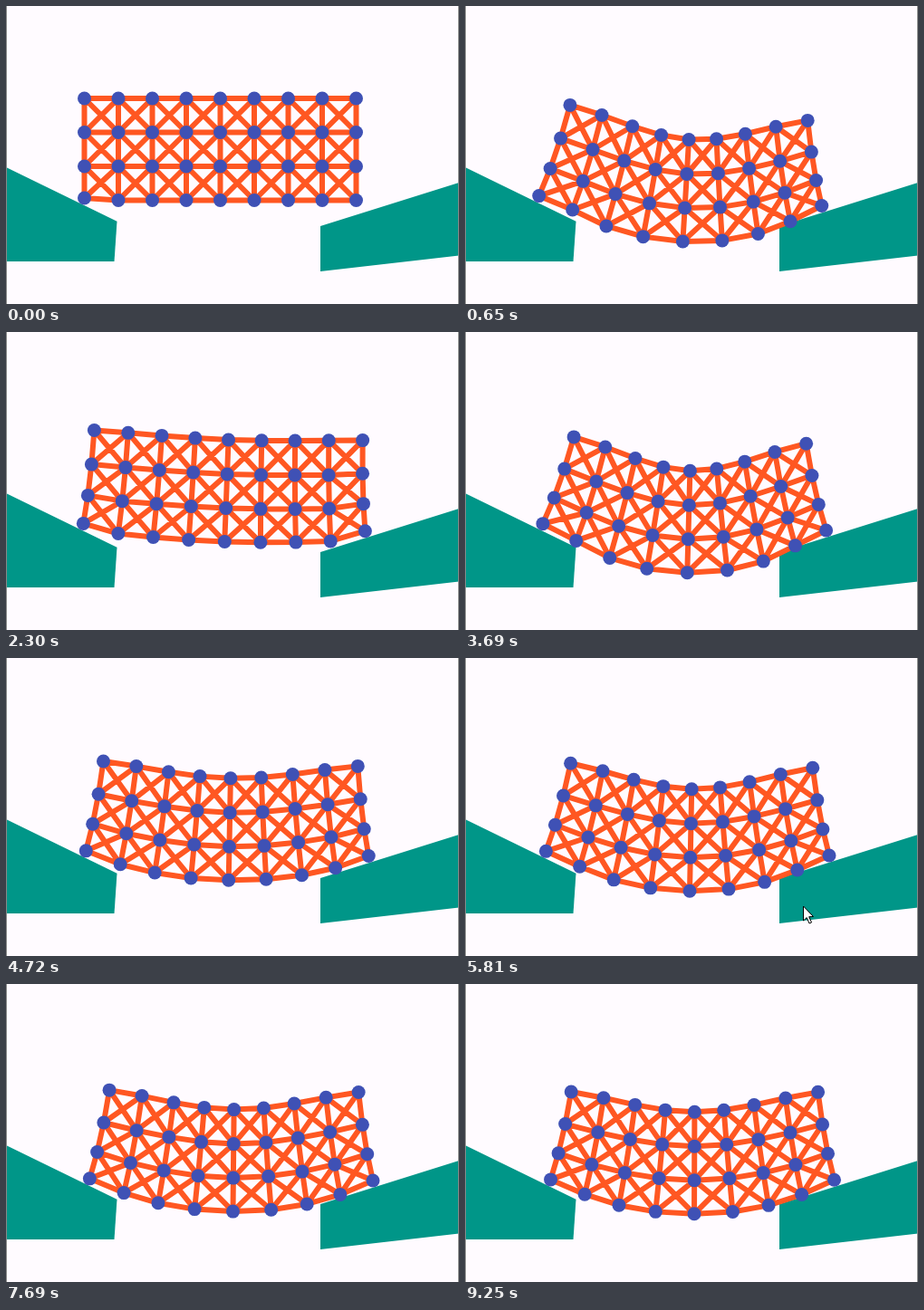
Recreate the animation shown at these times as an HTML page with a canvas. Size 500 px wide and 329 px high, loop 9270 ms.

```html
<!DOCTYPE html>
<html lang="en">
<head>
<meta charset="utf-8">
<title>Soft body</title>
<style>
html, body { margin: 0; width: 100%; height: 100%; overflow: hidden; background: #fffbff; }
canvas { display: block; }
</style>
</head>
<body>
<canvas id="stage" width="500" height="329"></canvas>
<script>
const ctx = document.getElementById('stage').getContext('2d');
const LOOP = 9270, COLS = 9, ROWS = 4, GAP = 37.5, HEIGHT = GAP * 3;

// Turning points of the bounce: seconds, bend in pixels.
const swings = [[0, 0], [1.1, 46], [2.4, 4.3], [3.74, 33.8], [4.9, 15],
  [6.08, 27.5], [7.15, 18.5], [8.52, 23.7], [9.6, 21.7]];

const lerp = (a, b, k) => a + (b - a) * k;
const swing = k => (1 - Math.cos(Math.PI * Math.min(1, k))) / 2;

function bendAt(t) {
  const i = swings.findIndex(s => s[0] > t);
  const [t0, a] = swings[i - 1], [t1, b] = swings[i];
  return lerp(a, b, swing((t - t0) / (t1 - t0)));
}

// Height of a node's centre resting on each ramp.
const leftRamp = x => 210 + 0.488 * (x - 82.5);
const rightRamp = x => 220 - 0.314 * (x - 395.5);

// Node positions [x, y], row by row: a grid that drops, then bends on its two feet.
function bodyAt(t) {
  const bend = bendAt(t);
  const landed = swing(t / 0.5);
  const leftX = 81.3 + 1.45 * t - 0.05 * (bend - 19);
  const rightX = 392.7 + 1.6 * t;
  const middle = (leftX + rightX) / 2;
  const rock = 4.5 * Math.exp(-t / 2) * Math.cos(2 * Math.PI * (t - 2.35) / 1.8);
  const tilt = (rightRamp(rightX) - leftRamp(leftX)) / 2 + rock;
  const lowY = 225 + (bend + 0.25 * t) / 0.85;

  const top = u => [
    middle + 0.1 * bend + 0.75 * tilt + (151.5 - 0.69 * bend) * u
      - 0.11 * bend * Math.sin(Math.PI * u),
    lowY - HEIGHT - bend * (1.55 * u ** 2 - 0.55 * u ** 4) + tilt * u
  ];
  const bottom = u => {
    if (u === -1) return [leftX, leftRamp(leftX)];
    if (u === 1) return [rightX, rightRamp(rightX)];
    const spread = 0.23 * Math.sin(Math.PI * u) * (1 - 0.6 * u * u);
    return [
      middle + (rightX - leftX) / 2 * u + bend * (spread + 0.09 * (1 - u * u)),
      lowY - 1.72 * bend * u * u + tilt * u
    ];
  };

  const nodes = [];
  for (let r = 0; r < ROWS; r++) {
    for (let c = 0; c < COLS; c++) {
      const u = c / 4 - 1, v = r / 3;
      const [x0, y0] = top(u), [x1, y1] = bottom(u);
      const inner = r > 0 && r < 3 ? 1 : 0;
      const bulge = 0.5 + 2.8 * u ** 8 + 0.6 * bend * u ** 4 * (1 - u * u);
      const x = lerp(86.5 + c * GAP, lerp(x0, x1, v) - u * inner, landed);
      let y = lerp(102 + r * GAP, lerp(y0, y1, v) + bulge * inner, landed);
      if (r === 3 && c === 0) y = Math.min(y, leftRamp(x));
      nodes.push([x, y]);
    }
  }
  return nodes;
}

function polygon(points, color) {
  ctx.fillStyle = color;
  ctx.beginPath();
  points.forEach(([x, y]) => ctx.lineTo(x, y));
  ctx.closePath();
  ctx.fill();
}

function drawBody(nodes) {
  const link = (c, r, c2, r2) => {
    if (c2 < 0 || c2 >= COLS || r2 >= ROWS) return;
    ctx.moveTo(...nodes[r * COLS + c]);
    ctx.lineTo(...nodes[r2 * COLS + c2]);
  };
  ctx.strokeStyle = '#ff5722';
  ctx.lineWidth = 6;
  ctx.beginPath();
  for (let r = 0; r < ROWS; r++) {
    for (let c = 0; c < COLS; c++) {
      link(c, r, c + 1, r);
      link(c, r, c, r + 1);
      link(c, r, c + 1, r + 1);
      link(c, r, c - 1, r + 1);
    }
  }
  ctx.stroke();
  ctx.fillStyle = '#3f51b5';
  for (const [x, y] of nodes) {
    ctx.beginPath();
    ctx.arc(x, y, 7.5, 0, Math.PI * 2);
    ctx.fill();
  }
}

function drawPointer(t) {
  if (t < 5.48 || t >= 6.25) return;
  ctx.save();
  ctx.translate(373.5, 278 - 4 * Math.min(1, (t - 5.48) / 0.2));
  polygon([[0, 0], [0, 16], [3.7, 12.6], [6.5, 19], [9, 18], [6.2, 11.7], [11, 11.5]], '#fff');
  ctx.strokeStyle = '#000';
  ctx.lineWidth = 1;
  ctx.stroke();
  ctx.restore();
}

function draw(t) {
  ctx.fillStyle = '#fffbff';
  ctx.fillRect(0, 0, 500, 329);
  polygon([[0, 178], [122.5, 237.7], [119.5, 282], [0, 282]], '#009688');
  polygon([[347, 243], [500, 195], [500, 275.5], [347, 293]], '#009688');
  drawBody(bodyAt(t));
  drawPointer(t);
  ctx.fillStyle = '#888';
  ctx.fillRect(0, 0, 1, 329);
  ctx.fillRect(499, 0, 1, 329);
}

const start = performance.now();
function tick() {
  draw((performance.now() - start) % LOOP / 1000);
  requestAnimationFrame(tick);
}
tick();
</script>
</body>
</html>
```
